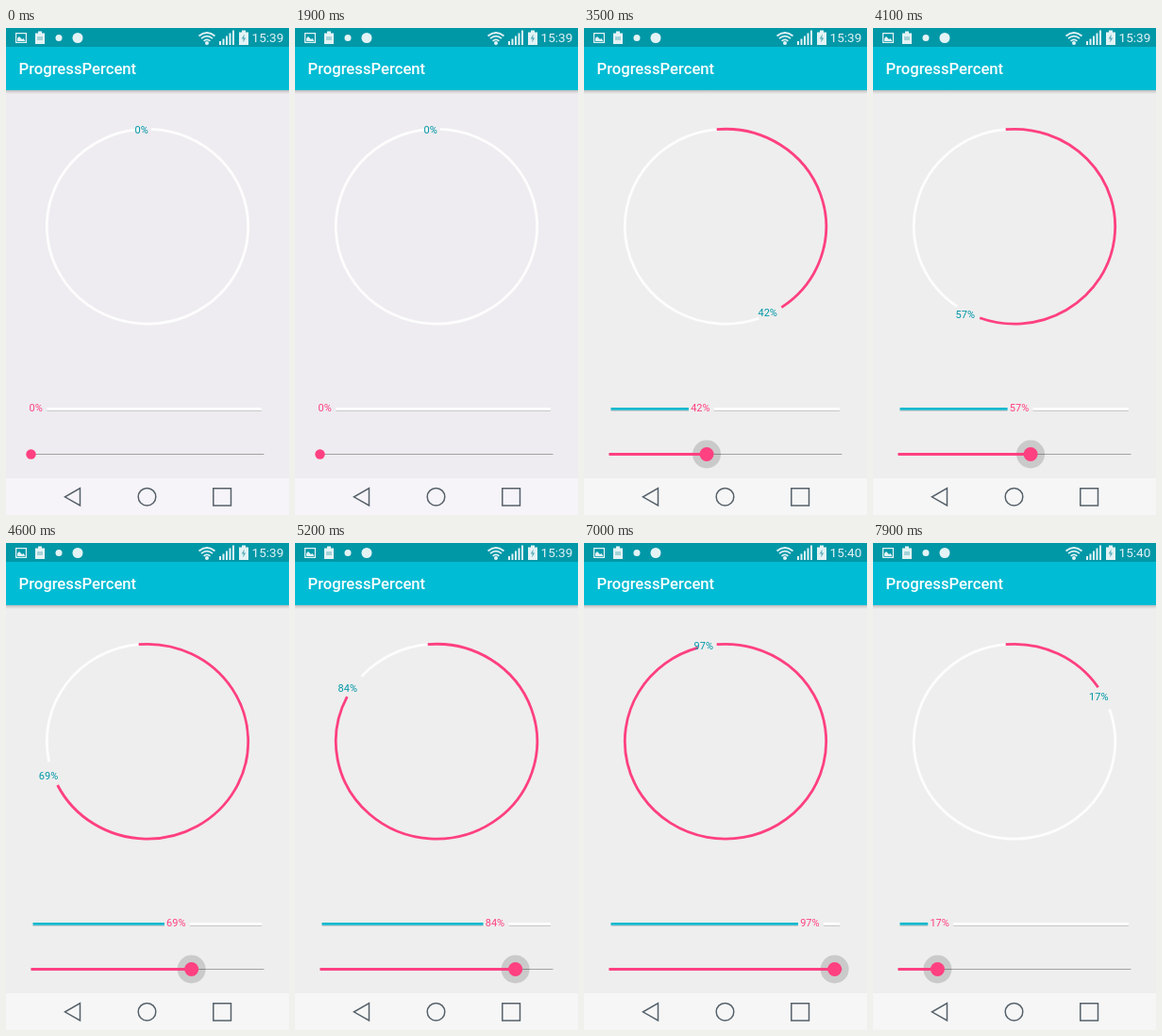
Write an HTML page that moves like this. It is 300 by 517 pixels and loops after 8 s.

```html
<!DOCTYPE html>
<html lang="en">
<head>
<meta charset="utf-8">
<title>Progress</title>
<style>
  html, body { margin: 0; width: 100%; height: 100%; overflow: hidden; background: #eee; }
  svg { display: block; width: 300px; height: 517px; font-family: Roboto, sans-serif; }
  .pct { font-size: 11px; }
  .line { fill: none; stroke-width: 2.8; }
  .white { stroke: #fdfdfd; }
  .pink { stroke: #ff4081; }
  .teal { stroke: #12b8ce; }
  .shade { stroke: #bdbdbd; stroke-width: 1; }
</style>
</head>
<body>
<svg viewBox="0 0 300 517">
  <defs>
    <linearGradient id="shadow" x2="0" y2="1">
      <stop offset="0" stop-color="#000" stop-opacity=".2"/>
      <stop offset="1" stop-color="#000" stop-opacity="0"/>
    </linearGradient>
  </defs>
  <rect id="page" width="300" height="517"/>
  <rect y="66" width="300" height="4" fill="url(#shadow)"/>
  <rect y="20" width="300" height="46" fill="#00bcd4"/>
  <rect width="300" height="20" fill="#0097a7"/>
  <text x="13.5" y="49.3" font-size="16.67" font-weight="500" fill="#fff">ProgressPercent</text>

  <g fill="#e3f3f5">
    <path d="M10 5h12v11h-12zM11.2 6.2v8.6h9.6V6.200z" fill-rule="evenodd"/>
    <path d="M12 14v-3l2-2 3 3 1.500-1 2 3z"/>
    <path d="M34 3.500h4v2h3v11.500h-10v-11.500h3z"/>
    <path d="M33 9h6v4h-6z" fill="#a5d3d9"/>
    <circle cx="56" cy="10.500" r="3.500"/>
    <circle cx="76" cy="10.500" r="5.500"/>
    <path d="M226 14h2v4h-2zM229.500 11.500h2v6.500h-2zM233 8.500h2v9.500h-2zM236.500 5.500h2v12.500h-2zM240 2.500h2v15.500h-2z"/>
    <path d="M250 2.500h4v2h3v13.500h-10v-13.500h3z"/>
    <path d="M252.700 6.500l-3 5h2l-.5 4 3-5h-2z" fill="#58adb8"/>
    <circle cx="213" cy="16" r="2"/>
    <path d="M204.500 8.500q8.500-7 17 0M207 11.200q6-5 12 0M209.600 13.800q3.400-2.800 6.800 0" fill="none" stroke="#e3f3f5" stroke-width="1.700"/>
    <text id="clock" x="260.500" y="15.300" font-size="13.600"></text>
  </g>

  <path id="ringRest" class="line white"/>
  <path id="ringDone" class="line pink"/>
  <text id="ringText" class="pct" fill="#0097a7"/>

  <path id="barShade" class="line shade"/>
  <path id="barRest" class="line white"/>
  <path id="barDone" class="line teal"/>
  <text id="barText" class="pct" y="407.300" fill="#ff4081"/>

  <path class="line" d="M26.500 452.500H273.500" stroke="#a2a2a2" style="stroke-width:1.200"/>
  <circle id="halo" cy="452.500" fill="#000" fill-opacity=".15"/>
  <path id="seekDone" class="line pink"/>
  <circle id="knob" cy="452.500" fill="#ff4081"/>

  <rect id="nav" y="478" width="300" height="39"/>
  <g fill="none" stroke="#56616a" stroke-width="1.500">
    <path d="M78.500 488.500v18.500l-16-9.200zM219.800 488.700h18.700v18.300h-18.700z"/>
    <circle cx="149.500" cy="497.700" r="9.300"/>
  </g>
</svg>
<script>
const LOOP = 8000, START = -5;
const el = id => document.getElementById(id);
const set = (id, attrs) => {
  for (const name in attrs) el(id).setAttribute(name, attrs[name]);
};

// [time in ms, percent]
const drag = [[1950, 0], [2200, 6], [2900, 28.4], [4100, 57.4], [5200, 84.4], [5900, 100],
  [6400, 100], [7000, 97.4], [7200, 89], [7500, 56], [7900, 17.4], [8000, 13]];

function percentAt(t) {
  const i = drag.findIndex(key => key[0] > t);
  if (i < 1) return 0;
  const [t0, p0] = drag[i - 1], [t1, p1] = drag[i];
  return Math.floor(p0 + (p1 - p0) * (t - t0) / (t1 - t0));
}

// Point on the ring, in degrees clockwise from the top
function ringPoint(deg) {
  const a = deg * Math.PI / 180;
  return [150 + 106.7 * Math.sin(a), 210.7 - 103.4 * Math.cos(a)];
}

function arc(from, to) {
  if (to <= from) return "";
  const mid = (from + to) / 2;
  return `M${ringPoint(from)}` +
    [mid, to].map(deg => `A106.700 103.400 0 0 1 ${ringPoint(deg)}`).join("");
}

const segment = (y, from, to) => to > from ? `M${from} ${y}H${to}` : "";

function draw(t) {
  const percent = percentAt(t), label = percent + "%";
  const digits = label.length - 1;
  const press = Math.min(1, Math.max(0, (t - 1950) / 150));

  set("page", { fill: t < 1950 ? "#eeecf0" : "#eeeeee" });
  set("nav", { fill: t < 1950 ? "#f6f4f8" : "#f6f6f6" });
  el("clock").textContent = t < 6100 ? "15:39" : "15:40";

  const end = START + 3.6 * percent;
  const [x, y] = ringPoint(end + 6);
  set("ringDone", { d: arc(START, end) });
  set("ringRest", { d: arc(end + 7.5 * digits - 0.5, START + 360) });
  set("ringText", { x: x - 15.3, y: y + 4.2 });

  const barEnd = 22.4 + 2.109 * percent, barNext = barEnd + 15 + 6 * digits;
  set("barDone", { d: segment(404.3, 28.5, barEnd) });
  set("barRest", { d: segment(404.3, barNext, 271) });
  set("barShade", { d: segment(406.2, 28.5, barEnd) + segment(406.2, barNext, 271) });
  set("barText", { x: barEnd + 2.2 });
  el("ringText").textContent = el("barText").textContent = label;

  const cx = 26.5 + 2.466 * percent;
  set("seekDone", { d: segment(452.5, 26.5, cx) });
  set("halo", { cx, r: 15 * press });
  set("knob", { cx, r: 5.2 + 2.3 * press });
}

const begin = performance.now();
function tick() {
  draw((performance.now() - begin) % LOOP);
  requestAnimationFrame(tick);
}
tick();
</script>
</body>
</html>
```
